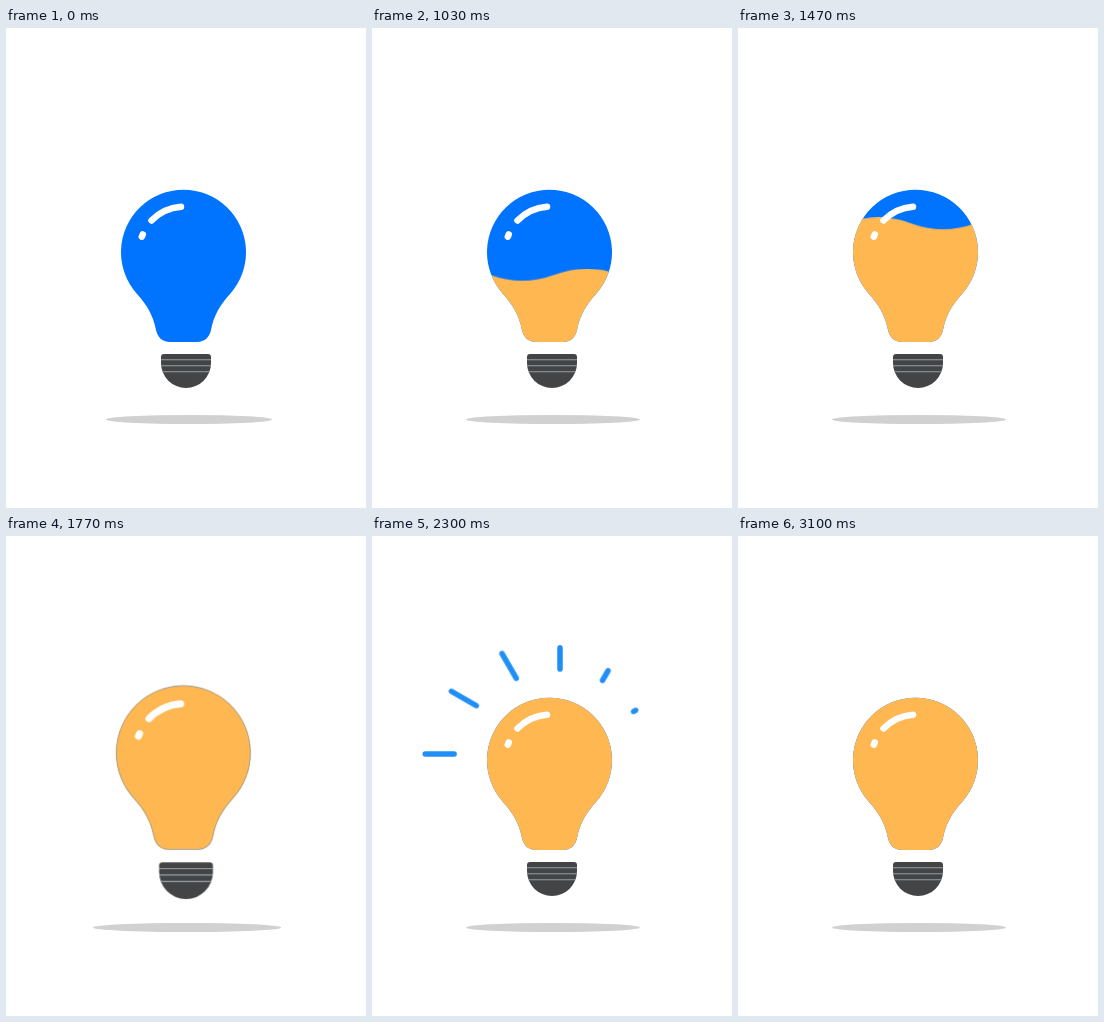
Recreate the animation shown at these times as an HTML page. Size 360 by 480 pixels, loop 5.47 s.

```html
<!DOCTYPE html>
<html lang="en">
<head>
<meta charset="utf-8">
<title>Light bulb</title>
<style>
  html, body { margin: 0; width: 100%; height: 100%; overflow: hidden; background: #fff; }
  svg { display: block; width: 100%; height: 100%; }

  .lamp, .shadow, .liquid, .rays, .ray { animation: 5470ms linear infinite; }

  .lamp { transform-origin: 180px 320.5px; animation-name: pop; }
  .shadow { transform-origin: 181px 391.5px; animation-name: spread; }
  .liquid { animation-name: fill; }
  .rays { fill: none; stroke-width: 5.5; stroke-linecap: round; animation-name: tint; animation-timing-function: step-end; }
  .ray { opacity: 0; animation-name: shoot; animation-delay: calc(1880ms + 80ms * var(--i)); }

  /* the filled bulb swells once and settles */
  @keyframes pop {
    0%, 30.53% { transform: scale(1); animation-timing-function: ease-in-out; }
    34.19% { transform: scale(1.151); animation-timing-function: ease-in-out; }
    37.84%, 100% { transform: scale(1); }
  }
  @keyframes spread {
    0%, 6.76% { transform: translateX(2px) scaleX(.954); }
    12.25% { transform: translateX(.5px) scaleX(.983); }
    18.1%, 30.53% { transform: scaleX(1); animation-timing-function: ease-in-out; }
    34.19% { transform: scaleX(1.16); animation-timing-function: ease-in-out; }
    37.84%, 100% { transform: scaleX(1); }
  }
  /* the wave drifts right while the level rises */
  @keyframes fill {
    0%, 6.76% { transform: translate(0, 0); }
    34.19%, 100% { transform: translate(187.5px, -175.5px); }
  }
  @keyframes tint {
    0% { stroke: #666; }
    37.48%, 100% { stroke: #1f8ff7; }
  }
  /* each ray grows outward, travels, then shrinks into its tip */
  @keyframes shoot {
    0% { opacity: 1; stroke-dasharray: 0px 200px; stroke-dashoffset: 0px; }
    1.83% { stroke-dasharray: 11px 200px; }
    4.39% { stroke-dasharray: 28.5px 200px; stroke-dashoffset: 0px; }
    9.14% { stroke-dasharray: 29px 200px; stroke-dashoffset: -30px; }
    13.52% { opacity: 1; stroke-dasharray: 0px 200px; stroke-dashoffset: -59px; }
    13.53%, 100% { opacity: 0; stroke-dasharray: 0px 200px; stroke-dashoffset: -59px; }
  }
</style>
</head>
<body>
<svg viewBox="0 0 360 480" aria-label="Light bulb filling up and lighting">
  <defs>
    <path id="glass" d="M131 266C141 277 147 287 150 302c1.5 7 6 12 14 12h27c8 0 12.5-5 14-12C208 287 214 277 224 266A62.5 62.5 0 1 0 131 266Z"/>
    <path id="socket" d="M158 326h44q3 0 3 3v6a25 25 0 0 1-50 0v-6q0-3 3-3Z"/>
    <path id="ray" d="M103 218H44"/>
    <clipPath id="inGlass"><use href="#glass"/></clipPath>
    <clipPath id="inSocket"><use href="#socket"/></clipPath>
  </defs>

  <ellipse class="shadow" cx="181" cy="391.5" rx="87" ry="4.5" fill="#d1d1d1"/>

  <g class="rays">
    <g><use class="ray" href="#ray" style="--i:0"/></g>
    <g transform="rotate(30 188 218)"><use class="ray" href="#ray" style="--i:1"/></g>
    <g transform="rotate(60 188 218)"><use class="ray" href="#ray" style="--i:2"/></g>
    <g transform="rotate(90 188 218)"><use class="ray" href="#ray" style="--i:3"/></g>
    <g transform="rotate(120 188 218)"><use class="ray" href="#ray" style="--i:4"/></g>
    <g transform="rotate(150 188 218)"><use class="ray" href="#ray" style="--i:5"/></g>
    <g transform="rotate(180 188 218)"><use class="ray" href="#ray" style="--i:6"/></g>
  </g>

  <g class="lamp">
    <use href="#glass" fill="#0073ff"/>
    <g clip-path="url(#inGlass)">
      <path class="liquid" fill="#ffb751" d="M-160 324q32.5-12 65 0t65 0 65 0 65 0 65 0 65 0 65 0v400h-520Z"/>
    </g>
    <g fill="none" stroke="#fff" stroke-width="6.5" stroke-linecap="round">
      <path d="M145.5 192.5A46 46 0 0 1 175 178.7"/>
      <path d="M135.8 208.7L136.8 206.4"/>
    </g>
    <use href="#socket" fill="#434446"/>
    <path clip-path="url(#inSocket)" d="M150 331.7h60M150 337.7h60M150 343.7h60" stroke="#979fa5" stroke-width="1.1"/>
  </g>
</svg>
</body>
</html>
```
